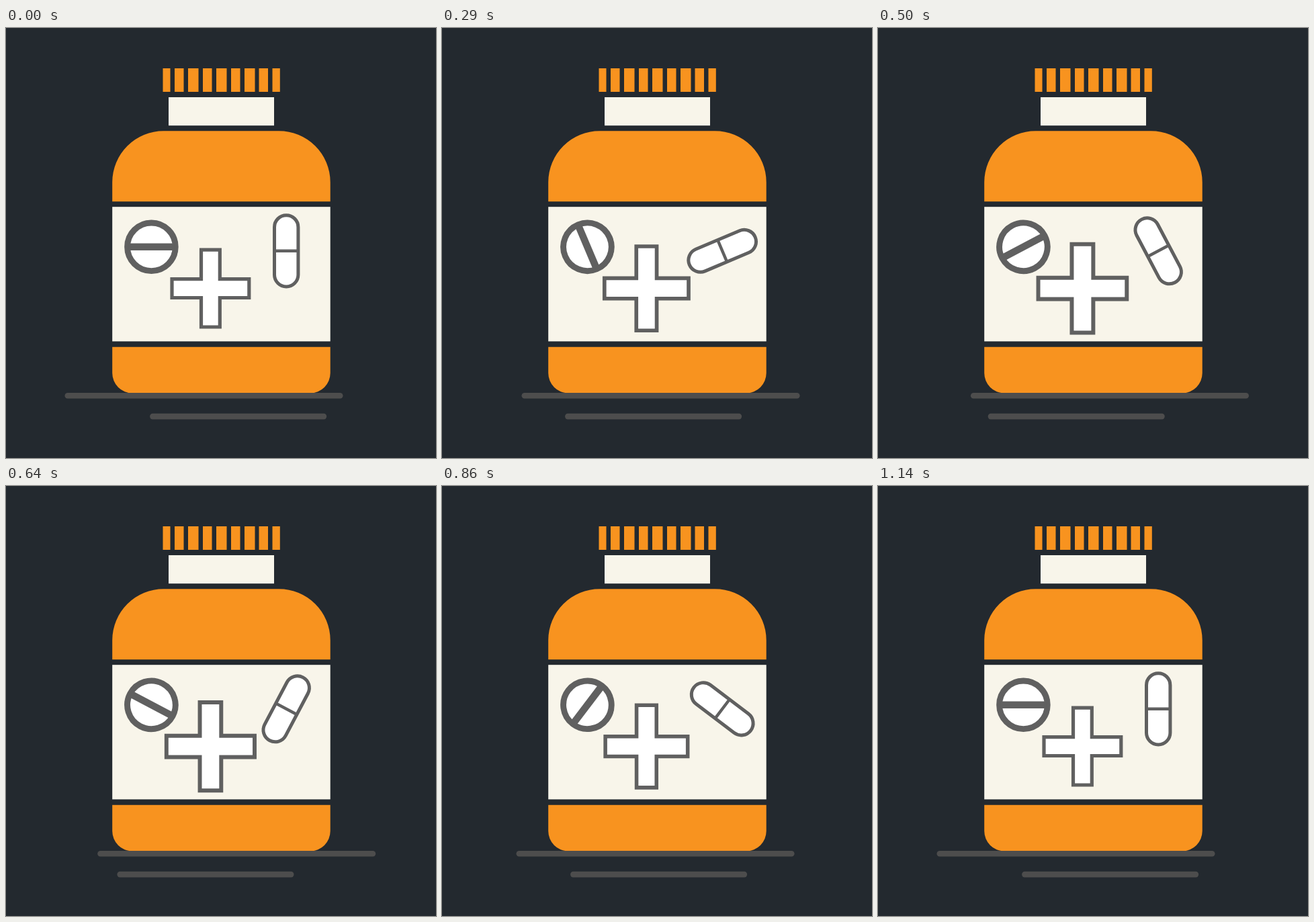
Recreate the animation shown at these times as an HTML page. Size 640 by 640 pixels, loop 1210 ms.

```html
<!DOCTYPE html>
<html lang="en">
<head>
<meta charset="utf-8">
<title>Pill bottle</title>
<style>
  html, body { margin: 0; width: 100%; height: 100%; overflow: hidden; background: #23292f; }
  svg { display: block; width: 100%; height: 100%; }
  .orange { fill: #f8931f; }
  .cream { fill: #f8f5ea; }
  .icon { fill: #fff; stroke: #606060; }
  .floor { fill: #4d4d4d; }
</style>
</head>
<body>
<svg viewBox="0 0 640 640">
  <path class="orange" d="M233.5 60h11v35h-11zM251 60h13.5v35H251zM271 60h15.5v35H271zM293 60h13.5v35H293zM313 60h15.5v35H313zM335 60h13.5v35H335zM355 60h15.5v35H355zM376.5 60h13.5v35h-13.5zM396.5 60h11.3v35h-11.3z"/>
  <rect class="cream" x="242" y="103" width="157" height="42.2"/>
  <path class="orange" d="M158.2 258.2V229.5A76.5 76.5 0 0 1 234.7 153.2H406.2A76.5 76.5 0 0 1 482.7 229.5V258.2Z"/>
  <rect class="cream" x="158.2" y="266.2" width="324.5" height="200.2"/>
  <path class="orange" d="M158.2 474.7H482.7V513.5A30 30 0 0 1 452.7 543.5H188.2A30 30 0 0 1 158.2 513.5Z"/>

  <g id="tablet" class="icon">
    <circle r="35.8" stroke-width="8.9"/>
    <path d="M-34 0H34" stroke-width="10.6"/>
  </g>
  <g id="capsule" class="icon">
    <rect x="-17.7" y="-53.1" width="35.4" height="106.2" rx="17.7" stroke-width="5"/>
    <path d="M-17 0H17" stroke-width="4.5"/>
  </g>
  <path id="cross" class="icon" stroke-width="5.2" d="M-13.9-57.4H13.9V-13.9H57.4V13.9H13.9V57.4H-13.9V13.9H-57.4V-13.9H-13.9Z"/>

  <rect id="upper" class="floor" x="87.5" y="542.9" width="414" height="8.6" rx="4.3"/>
  <rect id="lower" class="floor" x="214.1" y="573.8" width="263.1" height="8.6" rx="4.3"/>
</svg>
<script>
  const LOOP = 1210, FPS = 14, STEPS = 17;
  const LENGTH = 30, PEAK = 14, END = 29;
  const TRAVEL = 51.2, GROWTH = 0.15;

  const ease = x => x * x * (3 - 2 * x);
  const place = (id, transform) =>
    document.getElementById(id).setAttribute("transform", transform);

  function draw(time) {
    // Hold each pose for one step, on a clock rounded to 10 ms.
    const step = Math.min(STEPS - 1, Math.floor((time % LOOP + 5) * FPS / 1000));
    const pos = Math.ceil(step * LENGTH / STEPS);
    const angle = 360 * ease(pos / END);
    const swing = ease(pos < PEAK ? pos / PEAK : (END - pos) / (END - PEAK));

    place("tablet", `translate(216.4 325.8) rotate(${angle})`);
    place("capsule", `translate(417.2 331.8) rotate(${angle})`);
    place("cross", `translate(304.4 387.6) scale(${1 + GROWTH * swing})`);
    place("upper", `translate(${TRAVEL * swing} 0)`);
    place("lower", `translate(${-TRAVEL * swing} 0)`);
  }

  const start = performance.now();
  function tick() {
    draw(performance.now() - start);
    requestAnimationFrame(tick);
  }
  tick();
</script>
</body>
</html>
```
